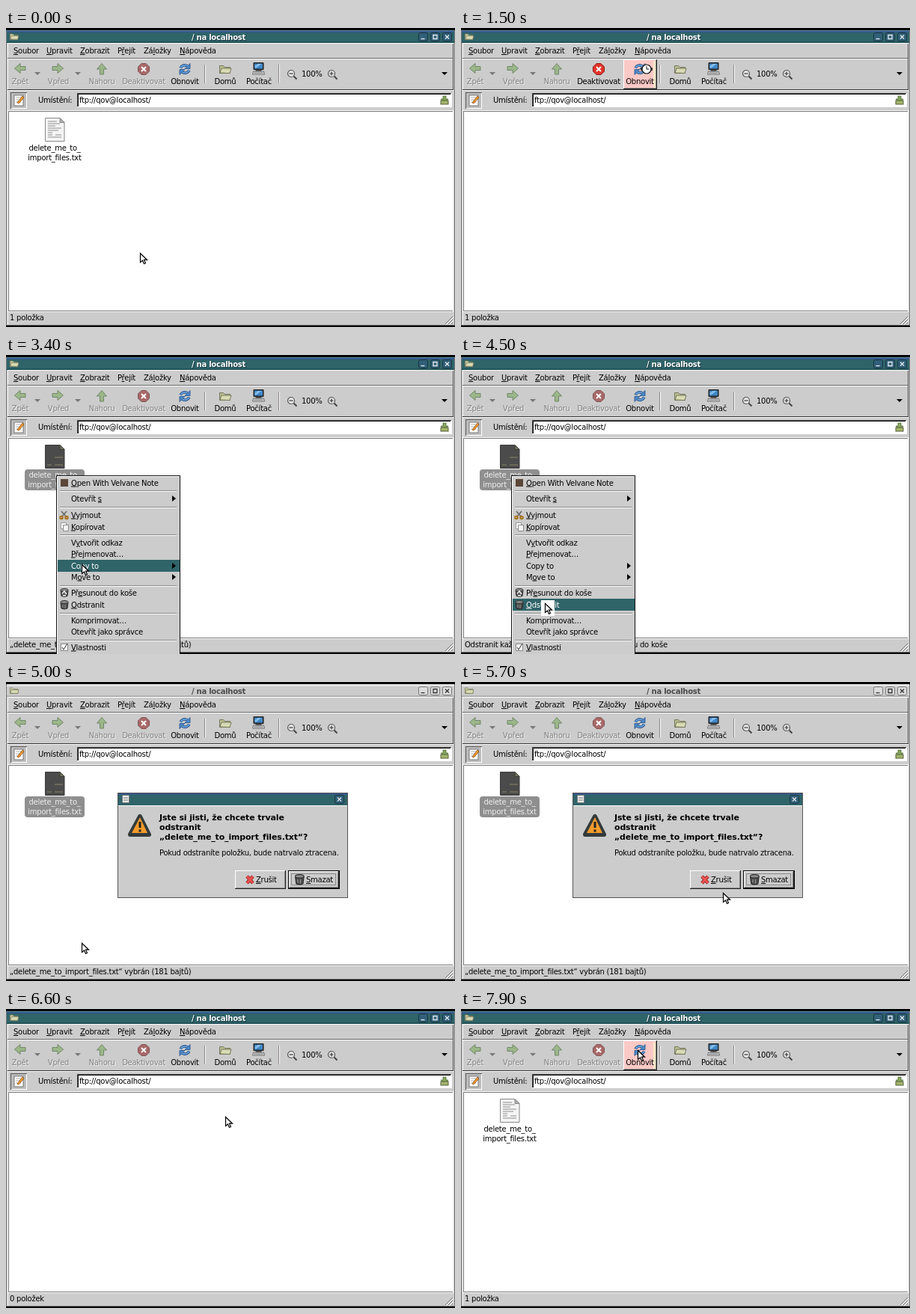
An HTML page for the animation above (8 s loop, 600x400 px).

```html
<!DOCTYPE html>
<html lang="cs">
<head>
<meta charset="utf-8">
<style>
html, body { margin: 0; width: 100%; height: 100%; overflow: hidden; background: #000; }
svg { display: block; width: 600px; height: 400px; }
text { font: 10px "DejaVu Sans", sans-serif; letter-spacing: -.25px; white-space: pre; }
.bold { font-weight: bold; }
.big { font-size: 10.9px; font-weight: bold; letter-spacing: -.1px; }
.u { text-decoration: underline; }
</style>
</head>
<body>
<svg id="stage" viewBox="0 0 600 400" xmlns="http://www.w3.org/2000/svg"></svg>
<script>
const LOOP = 8000, TEAL = '#2f6469', GREY = '#cccccc', DIM = '#858585';

const rect = (x, y, w, h, fill, more = '') =>
  `<rect x="${x}" y="${y}" width="${w}" height="${h}" fill="${fill}" ${more}/>`;
const path = (d, fill = 'none', stroke = 'none', w = 1) =>
  `<path d="${d}" fill="${fill}" stroke="${stroke}" stroke-width="${w}"/>`;
const circle = (x, y, r, fill, stroke = 'none', w = 1) =>
  `<circle cx="${x}" cy="${y}" r="${r}" fill="${fill}" stroke="${stroke}" stroke-width="${w}"/>`;
// An ampersand marks the underlined access key.
const text = (x, y, s, fill = '#000', cls = '', anchor = 'start') =>
  `<text x="${x}" y="${y}" fill="${fill}" class="${cls}" text-anchor="${anchor}">${
    s.replace(/&(.)/, '<tspan class="u">$1</tspan>')}</text>`;
const group = (id, body, more = '') => `<g id="${id}" ${more}>${body}</g>`;
const at = (x, y, body, turn = '') => `<g transform="translate(${x} ${y}) ${turn}">${body}</g>`;
const bevel = (x, y, w, h, fill) => rect(x, y, w, h, '#222') +
  rect(x, y, w - 1, h - 1, '#fff') + rect(x + 1, y + 1, w - 2, h - 2, '#888') +
  rect(x + 1, y + 1, w - 3, h - 3, fill);
const rule = (x, y, w) => rect(x, y, w, 1, '#888') + rect(x, y + 1, w, 1, '#fff');
const divider = x => rect(x, 49, 1, 25, '#8c8484') + rect(x + 1, 49, 1, 25, '#fff');

const folder = fill =>
  path('M.5 2.5h5l2 2h7v8h-14z', fill, '#77775c') + path('M1 12l2-6h13l-2 6.500z', '#d9dbb4', '#77775c');

const titleButton = (x, y, active) => rect(x + .5, y + .5, 12, 11, active ? '#315f78' : '#dcdcdc',
  `rx="2" stroke="${active ? '#17353c' : '#777'}"`);

function titleBar(active) {
  const ink = active ? '#fff' : '#4a4a4a', face = active ? TEAL : GREY;
  const button = (x, mark) => titleButton(x, 6, active) + path(mark, 'none', active ? '#e4ecf0' : '#333', 1.3);
  return rect(1, 3, 598, 17, face) + rect(1, 3, 598, 1, active ? '#5d93a0' : '#fff') +
    rect(1, 4, 598, 2, active ? '#35578c' : '#dedede') +
    rect(1, 18, 598, 2, active ? '#24545a' : '#b0b0b0') +
    at(5, 6, folder('#c9cca0'), 'scale(.75)') +
    (active ? text(285, 16.5, '/ na localhost', '#12343a', 'bold', 'middle') : '') +
    text(284, 15.5, '/ na localhost', ink, 'bold', 'middle') +
    button(551, 'M554.5 14.5h5') + button(567, 'M571 9.500h5v5h-5z') + button(583, 'M587 9.500l5 5m0-5l-5 5');
}

const arrow = path('M.5 7L8 .5v4h7v5H8v4z', '#9bb789', '#72866a');
const stop = (fill, edge) =>
  path('M5 .5h6l4.500 4.500v6L11 15.500H5L.5 11V5z', fill, edge) + path('M5 5l6 6m0-6l-6 6', 'none', '#fff', 2);
const halfTurn = path('M2.200 6.500A6 5.500 0 0 1 11.500 4', 'none', '#245089', 3.600) +
  path('M15 .5v7H8z', '#4a88c8', '#245089', .8) + path('M2.200 6.500A6 5.500 0 0 1 11.500 4', 'none', '#6ba5dd', 1.800);
const refresh = halfTurn + at(16, 16, halfTurn, 'rotate(180)');
const computer = rect(1, 0, 14, 10, '#222', 'rx="1"') + rect(2.500, 1.500, 11, 7, '#3f87c8') +
  path('M3 5l4-3h5l-8 6z', '#85bdea') + rect(4, 10, 8, 2, '#555') + path('M1 12h14l1 4H0z', '#dadada', '#555', .8) +
  path('M2 14h12', 'none', '#777');
const zoom = sign => circle(5, 5, 4.500, '#e6e6e6', '#555', 1.200) + path('M8.500 8.500l4 4', 'none', '#444', 2) +
  path(sign, 'none', '#333', 1.200);
const small = (x, fill) => path(`M${x} 59h8l-4 4z`, fill);
const bin = path('M.5 3l1 8q4 2 8 0l1-8z', '#4d4d4d', '#2b2b2b') +
  `<ellipse cx="5.500" cy="2.500" rx="5" ry="2" fill="#8d8d8d" stroke="#333"/>` + path('M3.500 6v4m3-4v5', 'none', '#999');

const label = (x, s, fill = '#000') => (fill === DIM ? text(x + 1, 76, s, '#eee', '', 'middle') : '') +
  text(x, 75, s, fill, '', 'middle');

function chrome() {
  const menus = [[10, '&Soubor'], [54, '&Upravit'], [99, '&Zobrazit'], [149, 'P&řejít'],
    [184, 'Zá&ložky'], [232, '&Nápověda']];
  return rect(0, 0, 600, 400, '#000') + rect(0, 3, 600, 395, '#777') + rect(1, 4, 598, 393, GREY) +
    group('inactive', titleBar(false)) + group('active', titleBar(true)) +
    rect(2, 20, 596, 1, '#fff') + rect(2, 20, 1, 377, '#f2f2f2') +
    menus.map(([x, s]) => text(x, 34, s)).join('') +
    rect(2, 40, 596, 1, '#666') + rect(2, 41, 596, 1, '#fff') + rect(597, 21, 1, 62, '#555') +
    rect(2, 82, 596, 1, '#333') + rect(2, 83, 596, 1, '#fff') +
    group('hover', bevel(217, 42, 45, 40, '#fac9c6') + rect(257, 44, 3, 36, '#fbe7c8')) +
    at(11, 47, arrow) + label(19, 'Zpět', DIM) + small(38, '#777') +
    at(77, 47, arrow, 'scale(-1 1)') + label(70, 'Vpřed', DIM) + small(92, '#777') +
    at(135, 47, arrow, 'rotate(90)') + label(128, 'Nahoru', DIM) +
    group('stopOff', at(176, 47, stop('#a86868', '#805555')) + label(184, 'Deaktivovat', DIM)) +
    group('stopOn', at(176, 47, stop('#e23329', '#931c17')) + label(184, 'Deaktivovat')) +
    at(231, 47, refresh) + label(239, 'Obnovit') + divider(265) +
    at(285, 48, folder('#b9bd91')) + label(293, 'Domů') +
    at(329.500, 46, computer) + label(338, 'Počítač') + divider(364) +
    at(376, 56, zoom('M2.500 5h5')) + text(395, 65, '100%') + at(430, 56, zoom('M2.500 5h5M5 2.500v5')) +
    small(582, '#000') +
    rect(6, 86, 22, 22, '#555') + rect(7, 87, 21, 21, '#fff') + rect(7, 87, 20, 20, '#bdbdbd') +
    rect(11, 90, 12, 14, '#fff', 'stroke="#777"') + path('M13 93h7m-7 3h5m-5 3h7', 'none', '#aaa') +
    path('M15 100l7-9 2 2-7 8z', '#ef9b2f', '#8b4c14', .8) +
    text(43, 100, 'Umístění:') +
    rect(95, 87, 501, 19, '#fff') + rect(95, 87, 500, 18, '#444') + rect(96, 88, 499, 17, '#fff') +
    rect(96, 88, 498, 1, '#111') + rect(96, 88, 1, 17, '#111') + text(98, 100, 'ftp://qov@localhost/') +
    path('M584 91h4v4h3l-5 5-5-5h3z', '#89a85d', '#526b36', .8) + rect(581, 97, 10, 5, '#a4b56c', 'stroke="#52603a"') +
    rect(2, 110, 596, 270, '#fff') + rect(3, 111, 594, 268, '#777') + rect(4, 112, 593, 266, '#fff') +
    `<text id="status" x="5" y="391"></text>` +
    path('M587 396l10-10m-6 10l6-6m-2 6l2-2', 'none', '#777') + path('M588 397l10-10m-6 10l6-6', 'none', '#fff');
}

const sheet = (fill, line, edge, marks) => path('M.5 .5h19.500l6 6v25H.5z', fill, edge) +
  path('M20 .5v6h6z', line, edge) + path(marks, 'none', line, 1.600);
const plainFile = sheet('#f4f4f4', '#b0b0b0', '#888',
  'M4 5h12M4 8h16M4 11h10M4 14h18M4 17h14M4 20h6M4 23h6m4 0h8M4 26h18');
const pickedFile = sheet('#4b4b4b', '#77745c', '#3a3a3a', 'M13 17h11M3 27h6m4 0h11');
const fileName = fill => text(65, 164, 'delete_me_to_', fill, '', 'middle') +
  text(65, 176.5, 'import_files.txt', fill, '', 'middle');

const items = [
  [171, '&Open With Velvane Note', 'app'], [192, 'Otevřít &s', 'more'], [214, '&Vyjmout', 'cut'],
  [230, '&Kopírovat', 'copy'], [251, 'V&ytvořit odkaz'], [266, '&Přejmenovat…'], [282, 'Copy to', 'more'],
  [297, 'M&ove to', 'more'], [318, 'Př&esunout do koše', 'trash'], [334, '&Odstranit', 'bin'],
  [355, 'Komprimovat…'], [370, 'Otevřít jako správce'], [391, '&Vlastnosti', 'props']];
const page = path('M.5 .5h7v8h-7z', '#fff', '#999') + path('M3.500 3.500h7v8h-7z', '#f3f3f3', '#888');
const marks = {
  app: rect(73, -5, 10, 10, '#5b4638'),
  more: path('M222-4l5 4-5 4z', '#000'),
  cut: path('M74-5l7 8m0-8l-7 8', 'none', '#666', 1.500) + circle(74, 3.500, 1.800, 'none', '#a8741a', 2) +
    circle(81, 3.500, 1.800, 'none', '#a8741a', 2),
  copy: at(73, -6, page),
  trash: at(72.500, -6, bin, 'scale(1 .95)') + path('M75 1l3-3 3 4m-5 2h4', 'none', '#eee', 1.500),
  bin: at(72.500, -6, bin),
  props: rect(73.500, -4.500, 9, 9, '#fff', 'stroke="#888"') + path('M75 0l2 3 5-8', 'none', '#555', 1.200)
};
const menu = rect(67, 161, 166, 240, '#111') + rect(68, 162, 164, 240, '#fff') + rect(69, 163, 163, 240, GREY) +
  [181, 203, 240, 308, 345, 381].map(y => rule(72, y, 156)).join('') +
  rect(69, 0, 163, 16, TEAL, 'id="bar"') +
  items.map(([y, s, mark]) => at(0, y, marks[mark] || '') +
    `<g class="item">${text(87, y + 3.500, s, 'inherit')}</g>`).join('');

const dialog = rect(149, 148, 308, 141, '#555') + rect(150, 149, 306, 139, GREY) +
  rect(150, 149, 306, 16, TEAL) + rect(150, 149, 306, 2, '#35578c') + rect(150, 165, 306, 1, '#fff') +
  rect(155.500, 151.500, 9, 10, '#e9e9e9', 'rx="1" stroke="#777"') + path('M157 155h6m-6 3h6', 'none', '#777') +
  titleButton(439, 151, true) + path('M443 154.500l5 5m0-5l-5 5', 'none', '#e4ecf0', 1.300) +
  `<path d="M179 180l12 24h-25z" fill="#f39a2d" stroke="#333a3c" stroke-width="6" stroke-linejoin="round"/>` +
  path('M179 181l10 21h-21z', '#f59b2c') + path('M179 187v8m0 2.500v3', 'none', '#222', 3) +
  text(205, 184.500, 'Jste si jisti, že chcete trvale', '#000', 'big') + text(205, 197.500, 'odstranit', '#000', 'big') +
  text(205, 210.500, '„delete_me_to_import_files.txt“?', '#000', 'big') +
  text(205, 232, 'Pokud odstraníte položku, bude natrvalo ztracena.') +
  bevel(306, 252, 68, 25, GREY) + group('overCancel', bevel(306, 252, 68, 25, '#f8d5cf')) +
  rect(377, 252, 69, 25, '#000') + bevel(378, 253, 67, 23, GREY) +
  group('overDelete', bevel(378, 253, 67, 23, '#f8d5cf')) +
  rect(381.500, 256.500, 59, 15, 'none', 'stroke="#444" stroke-dasharray="1 1"') +
  path('M322 260l8 9m0-9l-8 9', 'none', '#8f1a1a', 4.500) + path('M322 260l8 9m0-9l-8 9', 'none', '#ef5350', 2.800) +
  text(334, 268, '&Zrušit') + at(386, 257, bin, 'scale(1.150)') + text(401, 268, '&Smazat');

document.getElementById('stage').innerHTML = chrome() +
  group('file', at(52, 120, plainFile) + fileName('#000')) +
  group('picked', at(52, 120, pickedFile) + rect(25, 153, 80, 28, '#8f8f8f', 'rx="4"') + fileName('#eee')) +
  group('menu', menu) + group('dialog', dialog) +
  group('pointer', rect(-5, -4, 18, 21, '#fff', 'id="halo"') +
    path('M.5 .5v12l3-2.500 2 4.500 2-1-2-4.300h4z', '#fff', '#000', 1.200)) +
  group('watch', rect(-8, -2, 16, 4, '#333', 'rx="1"') + circle(0, 0, 6, '#fff', '#111', 1.200) +
    path('M0-4V0h3', 'none', '#111'));

const $ = id => document.getElementById(id);
const itemNodes = [...document.querySelectorAll('.item')];
const show = (id, on) => $(id).setAttribute('display', on ? 'inline' : 'none');
const within = (v, a, b) => v >= a && v < b;

// Pointer stops: time, x, y.
const stops = [[0, 179, 301], [300, 145, 225], [600, 212, 75], [800, 246, 28], [900, 246, 28], [1100, 241, 47],
  [1700, 241, 49], [1800, 205, 58], [2300, 68, 162], [2700, 68, 162], [2900, 80, 165], [3600, 110, 326],
  [3800, 112, 332], [4600, 112, 332], [5300, 92, 362], [5450, 170, 350], [5700, 350, 282], [5850, 408, 264],
  [6000, 408, 264], [6200, 365, 205], [6600, 293, 144], [6900, 262, 84], [7200, 238, 57], [7900, 236, 55], [8000, 236, 55]];

function pointerAt(t) {
  const i = stops.findIndex((s, n) => n && t <= s[0]);
  const [t0, x0, y0] = stops[i - 1], [t1, x1, y1] = stops[i];
  const k = (t - t0) / (t1 - t0);
  return [x0 + (x1 - x0) * k, y0 + (y1 - y0) * k];
}

function draw(ms) {
  const t = Math.floor(ms % LOOP / 100) * 100;
  const [x, y] = pointerAt(t);
  const busy = within(t, 1300, 1700) || within(t, 7400, 7700);
  const menuOpen = within(t, 2400, 4600), asking = within(t, 4800, 6300);
  const picked = within(t, 2400, 6300), gone = within(t, 6300, 7700);
  const over = menuOpen && x > 68 ? items.findIndex(([c]) => t > 2700 && Math.abs(y - c) <= 8) : -1;

  show('active', !asking);
  show('inactive', asking);
  show('stopOn', busy);
  show('stopOff', !busy);
  show('hover', !asking && within(x, 217, 262) && within(y, 42, 82));
  show('file', !picked && !gone && !busy);
  show('picked', picked);
  show('menu', menuOpen);
  show('dialog', asking);
  show('overCancel', within(x, 306, 374) && within(y, 252, 277));
  show('overDelete', within(x, 378, 445) && within(y, 252, 277));
  show('bar', over >= 0);
  if (over >= 0) $('bar').setAttribute('y', items[over][0] - 8);
  itemNodes.forEach((node, i) => node.setAttribute('fill', i === over ? '#fff' : '#000'));
  $('status').textContent = menuOpen && over === 9 ? 'Odstranit každou vybranou položku bez přesunu do koše'
    : picked ? '„delete_me_to_import_files.txt“ vybrán (181 bajtů)' : gone ? '0 položek' : '1 položka';
  show('pointer', !busy);
  show('watch', busy);
  show('halo', within(t, 3700, 4600));
  $('pointer').setAttribute('transform', `translate(${Math.round(x)} ${Math.round(y)})`);
  $('watch').setAttribute('transform', `translate(${Math.round(x) + 7} ${Math.round(y) + 7})`);
}

const start = performance.now();
function tick() {
  draw(performance.now() - start);
  requestAnimationFrame(tick);
}
tick();
</script>
</body>
</html>
```
